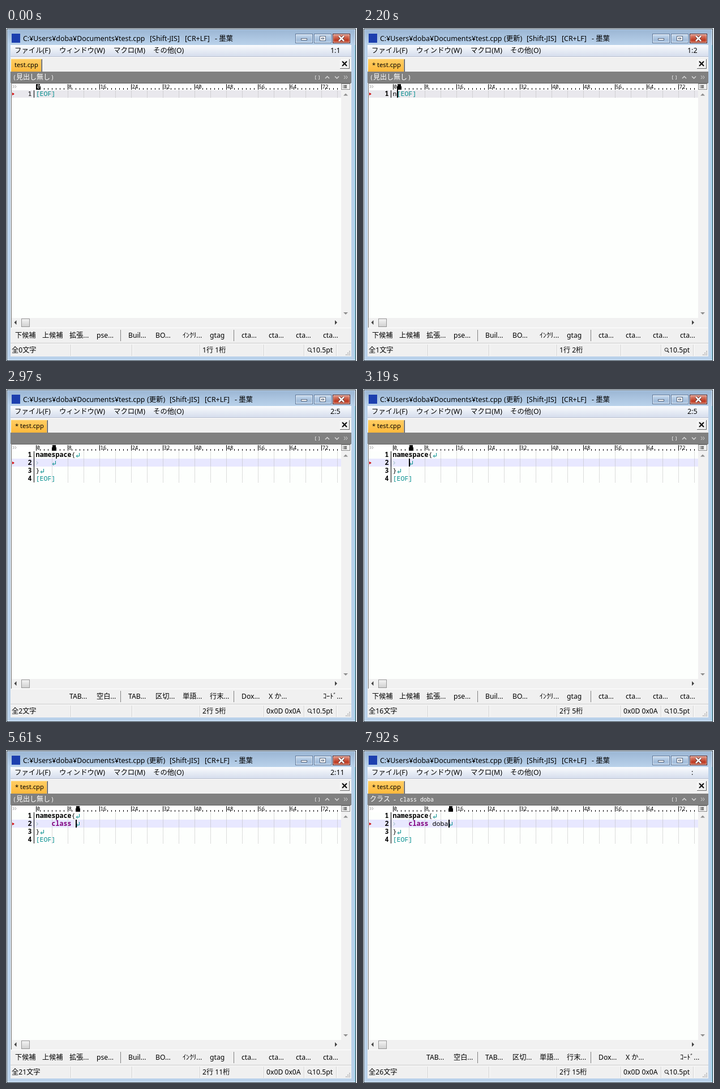
Recreate the animation shown at these times as an HTML page with a canvas. Size 620x588 px, loop 8000 ms.

```html
<!DOCTYPE html>
<html lang="ja">
<head>
<meta charset="utf-8">
<title>Editor</title>
<style>
html, body { margin: 0; width: 620px; height: 588px; overflow: hidden; background: #fff; }
canvas { display: block; }
</style>
</head>
<body>
<canvas id="stage" width="620" height="588"></canvas>
<script>
const ctx = document.getElementById('stage').getContext('2d');
const LOOP = 8000, CELL = 7, ROW = 14, LEFT = 53, TOP = 109;
const UI = '"Noto Sans", "Noto Sans CJK JP", sans-serif';
const MONO = '"Noto Sans Mono", "Noto Sans CJK JP", monospace';
const TEAL = '#008c8c';

const KEYS = ['下候補', '上候補', '拡張...', 'pse...', 'Buil...', 'BO...', 'ｲﾝｸﾘ...', 'gtag',
  'cta...', 'cta...', 'cta...', 'cta...'];
const ALT_KEYS = ['', '', 'TAB...', '空白...', 'TAB...', '区切...', '単語...', '行末...',
  'Dox...', 'X か...', '', 'ｺｰﾄﾞ...'];

const single = text => ({ lines: [text], row: 0, col: text.length, on: true });
const block = text => ({ lines: ['namespace{', '\t' + text, '}', ''], row: 1, col: 4 + text.length, on: true });

// Each step overrides part of the editor state from its time on.
const STEPS = [
  [0, { ...single(''), on: false, count: 0, head: '', noHead: true, alt: false, edited: false, pos: '' }],
  [550, { on: true }],
  [1100, { on: false }],
  [1540, { on: true }],
  [2090, { ...single('n'), edited: true }],
  [2200, { count: 1 }],
  [2640, single('ns')],
  [2750, { on: false, count: 2, alt: true }],
  [2860, { ...single('namespace'), on: false }],
  [2970, { ...block(''), on: false, noHead: false }],
  [3080, { on: true, count: 16 }],
  [3190, { alt: false }],
  [3300, { noHead: true }],
  [3630, { on: false }],
  [4180, { on: true }],
  [4510, block('c')],
  [4620, { count: 17 }],
  [4730, block('cl')],
  [4840, { count: 18 }],
  [5060, block('cla')],
  [5170, { ...block('clas'), count: 19 }],
  [5280, { ...block('class'), count: 20 }],
  [5390, { count: 21 }],
  [5610, block('class ')],
  [5830, { count: 22 }],
  [6160, { on: false }],
  [6380, block('class d')],
  [6490, { ...block('class do'), count: 23, head: 'class d', noHead: false }],
  [6600, { count: 24, head: 'class do' }],
  [6710, { ...block('class dob'), count: 25, head: 'class dob' }],
  [6820, { ...block('class doba'), count: 26, head: 'class doba' }],
  [7260, { on: false }],
  [7700, { alt: true }],
  [7810, { on: true }],
  [7920, { pos: ':' }]
];

const stateAt = t => Object.assign({}, ...STEPS.filter(s => s[0] <= t).map(s => s[1]));

function box(x, y, w, h, color) {
  ctx.fillStyle = color;
  ctx.fillRect(x, y, w, h);
}

function fade(x, y, w, h, ...colors) {
  const g = ctx.createLinearGradient(0, y, 0, y + h);
  colors.forEach((c, i) => g.addColorStop(i / (colors.length - 1), c));
  box(x, y, w, h, g);
}

function frame(x, y, w, h, color) {
  ctx.strokeStyle = color;
  ctx.lineWidth = 1;
  ctx.strokeRect(x + .5, y + .5, w - 1, h - 1);
}

function path(points, color, width = 1) {
  ctx.strokeStyle = color;
  ctx.lineWidth = width;
  ctx.beginPath();
  points.forEach(([x, y]) => ctx.lineTo(x, y));
  ctx.stroke();
}

function poly(points, color) {
  ctx.fillStyle = color;
  ctx.beginPath();
  points.forEach(([x, y]) => ctx.lineTo(x, y));
  ctx.fill();
}

function label(text, x, y, color = '#000', size = 12.4, family = UI, weight = 400) {
  ctx.font = `${weight} ${size}px ${family}`;
  ctx.fillStyle = color;
  ctx.fillText(text, x, y);
}

const code = (text, col, row, color = '#000', weight = 400) =>
  label(text, LEFT - .5 + col * CELL, TOP + 11 + row * ROW, color, 11.667, MONO, weight);

function drawWindow(s) {
  box(0, 0, 620, 588, '#e9f1f8');
  box(1, 1, 617, 587, '#b9d1ea');
  fade(2, 2, 615, 28, '#9ab5d3', '#bad2eb');
  frame(1, 1, 617, 587, '#28323c');
  frame(2, 2, 615, 585, '#d8e8f6');
  box(616, 30, 1, 556, '#7fdcf2');
  box(8, 30, 602, 550, '#f0f0f0');

  box(10, 10, 15, 16, '#1c3fae');
  label('C:¥Users¥doba¥Documents¥test.cpp', 30, 23);
  if (s.edited) label('(更新)', 249, 23);
  const shift = s.edited ? 35 : 0;
  label('[Shift-JIS]', 254 + shift, 23);
  label('[CR+LF]', 316 + shift, 23);
  label('- 墨葉', 369 + shift, 23);

  for (const x of [511, 544, 577]) {
    const close = x === 577;
    if (close) fade(x, 10, 31, 17, '#e9a596', '#d06a55', '#bd3a22', '#d3745c');
    else fade(x, 10, 31, 17, '#d3e2f2', '#b4cbe4', '#a2bcda', '#bdd4ec');
    frame(x, 10, 31, 17, close ? '#5a1f1c' : '#61799a');
    frame(x + 1, 11, 29, 15, 'rgba(255,255,255,.5)');
  }
  box(521, 18, 11, 4, '#fff');
  frame(521, 18, 11, 4, '#56657c');
  box(554, 14, 11, 9, '#fff');
  frame(554, 14, 11, 9, '#56657c');
  frame(557, 17, 5, 3, '#56657c');
  for (const [color, width] of [['#5c3434', 4.5], ['#fff', 2.5]]) {
    path([[588, 14], [597, 23]], color, width);
    path([[597, 14], [588, 23]], color, width);
  }

  fade(8, 30, 602, 20, '#fbfcfe', '#e7ecf5', '#d6dded');
  box(8, 50, 602, 1, '#b6bccc');
  box(8, 51, 602, 1, '#fff');
  label('ファイル(F)', 15, 44);
  label('ウィンドウ(W)', 94, 44);
  label('マクロ(M)', 190, 44);
  label('その他(O)', 260, 44);
  label(s.pos || `${s.row + 1}:${s.col + 1}`, s.pos ? 580 : 573, 44);
}

function drawTab(s) {
  const w = s.edited ? 65 : 55;
  fade(9, 55, w, 22, '#ffcd63', '#ffb93c');
  box(9, 54, w - 1, 1, '#fff2d0');
  box(8, 55, 1, 22, '#fff');
  box(7 + w, 56, 1, 21, '#a0a0a0');
  box(8 + w, 55, 1, 22, '#505050');
  if (s.edited) label('*', 16, 69, '#000', 11.2);
  label('test.cpp', s.edited ? 25 : 15, 69, '#000', 11.2);

  box(590, 55, 16, 16, '#f0f0f0');
  frame(590, 55, 17, 17, '#696969');
  path([[590.5, 71], [590.5, 55.5], [606, 55.5]], '#fff');
  path([[594, 59], [602, 67]], '#000', 2);
  path([[602, 59], [594, 67]], '#000', 2);
}

function drawHeading(s) {
  box(8, 77, 602, 20, '#808080');
  const mono = (text, x) => label(text, x, 91, '#fff', 10, MONO);
  if (s.noHead) {
    mono('(', 12);
    label('見出し無し', 18, 91, '#fff', 12);
    mono(')', 79);
  } else if (s.head) {
    label('クラス', 12, 91, '#fff', 12);
    mono('- ' + s.head, 53);
  }
  const c = '#d8d8d8';
  path([[548, 84.5], [546.5, 84.5], [546.5, 90.5], [548, 90.5]], c);
  path([[552, 84.5], [553.5, 84.5], [553.5, 90.5], [552, 90.5]], c);
  path([[564, 89], [567.5, 85.5], [571, 89]], c, 1.5);
  path([[581, 85.5], [584.5, 89], [588, 85.5]], c, 1.5);
  for (const x of [597, 600.5]) path([[x, 84], [x + 2.5, 87], [x, 90]], c);
}

function drawRuler(s) {
  box(9, 97, 600, 13, '#fff');
  box(9, 97, 600, 1, '#606060');
  for (const x of [12, 15.5]) path([[x, 101], [x + 2.5, 103.5], [x, 106]], '#909090');
  for (let col = 0; col <= 76; col++) {
    const x = LEFT + col * CELL, major = col % 8 === 0;
    box(x, major ? 99 : 106, 1, major ? 10 : 3, '#000');
    if (major) label(col, x + 1.5, 107, '#000', 9, MONO);
  }
  const x = LEFT + s.col * CELL;
  box(x + 1, 99, 6, 10, '#000');
  box(x, 103, 8, 6, '#000');
  if (s.col === 0) label('0', x + 1.5, 107, '#fff', 9, MONO);

  box(592, 98, 16, 12, '#f0f0f0');
  frame(592, 98, 16, 11, '#8c8c8c');
  for (const y of [101, 103, 105]) {
    box(595, y, 1, 1, '#222');
    box(597, y, 5, 1, '#222');
  }
}

function drawText(s) {
  box(9, 110, 583, 402, '#fdfffd');
  const height = s.lines.length * ROW, multi = s.lines.length > 1;
  box(10, TOP + s.row * ROW, 582, ROW, multi ? '#e8e8ff' : '#e9e8ed');
  for (let x = LEFT + 28; x < 591; x += 28)
    for (let y = TOP + 1; y < TOP + height; y += 2) box(x, y, 1, 1, '#b9b9b9');

  s.lines.forEach((line, row) => {
    const y = TOP + row * ROW;
    label(row + 1, 38.5, y + 11, '#000', 11.667, MONO, s.edited ? 700 : 400);
    box(49, y, 1, ROW, '#000');
    let col = 0;
    if (line[0] === '\t') {
      path([[54, y + 5], [56.5, y + 7.5], [54, y + 10]], '#8eb5b5');
      col = 4;
      line = line.slice(1);
    }
    const word = (line.match(/^(namespace|class)(?=\W|$)/) || [''])[0];
    if (word) code(word, col, row, word === 'class' ? '#800080' : '#000', 700);
    code(line.slice(word.length), col + word.length, row);
    col += line.length;
    if (row === s.lines.length - 1) {
      code('[EOF]', col, row, TEAL);
    } else {
      const x = LEFT + col * CELL;
      path([[x + 6.5, y + 4], [x + 6.5, y + 9.5], [x + 1.5, y + 9.5]], TEAL);
      path([[x + 3.5, y + 7], [x + 1.2, y + 9.5], [x + 3.5, y + 12]], TEAL);
    }
  });

  const y = TOP + s.row * ROW;
  poly([[11, y + 5], [15, y + 7.5], [11, y + 10]], '#d00000');
  if (s.on) box(LEFT + s.col * CELL, y, 2, ROW, '#000');
}

function drawScrollbars() {
  box(592, 110, 17, 402, '#f1f1f1');
  poly([[596, 119.5], [600, 115.5], [604, 119.5]], '#8d8d8d');
  poly([[596, 502], [600, 506], [604, 502]], '#8d8d8d');
  box(9, 512, 600, 17, '#f1f1f1');
  poly([[18.5, 516], [14.5, 520], [18.5, 524]], '#404040');
  poly([[581, 516], [585, 520], [581, 524]], '#404040');
  fade(27, 513, 15, 15, '#f6f6f6', '#e2e2e2', '#cfcfcf');
  frame(27, 513, 15, 15, '#979797');
  box(9, 97, 1, 432, '#707070');
  box(9, 529, 600, 1, '#fff');
}

function drawFooter(s) {
  (s.alt ? ALT_KEYS : KEYS).forEach((key, i) =>
    label(key, 16 + i * 48 + Math.floor(i / 4) * 8, 547, '#000', 12.2));
  for (const x of [202, 402]) box(x, 533, 1, 20, '#808080');

  box(8, 556, 602, 1, '#c8c8c8');
  box(8, 557, 602, 1, '#fff');
  for (const x of [114, 222, 342, 455, 526, 583]) {
    box(x, 559, 1, 20, '#d0d0d0');
    box(x + 1, 559, 1, 20, '#fff');
  }
  label(`全${s.count}文字`, 10, 573, '#000', 12.2);
  label(`${s.row + 1}行 ${s.col + 1}桁`, 347, 573, '#000', 12.2);
  if (s.lines.length > 1) label('0x0D 0x0A', 460, 573, '#000', 12.2);
  ctx.strokeStyle = '#222';
  ctx.lineWidth = 1;
  ctx.beginPath();
  ctx.arc(536, 568, 3, 0, Math.PI * 2);
  ctx.stroke();
  path([[538, 570.5], [540.5, 573]], '#222', 1.5);
  label('10.5pt', 541, 573, '#000', 12.2);
  for (let i = 0; i < 3; i++)
    for (let j = 0; j <= i; j++) box(606 - j * 3, 570 + i * 3, 2, 2, '#bcbcbc');
}

function draw() {
  const s = stateAt(performance.now() % LOOP);
  for (const part of [drawWindow, drawTab, drawHeading, drawText, drawRuler, drawScrollbars, drawFooter]) part(s);
  // The first row starts just under the ruler ticks, so the caret is kept on top.
  if (s.on && s.row === 0) box(LEFT + s.col * CELL, TOP, 2, ROW, '#000');
  requestAnimationFrame(draw);
}
draw();
</script>
</body>
</html>
```
